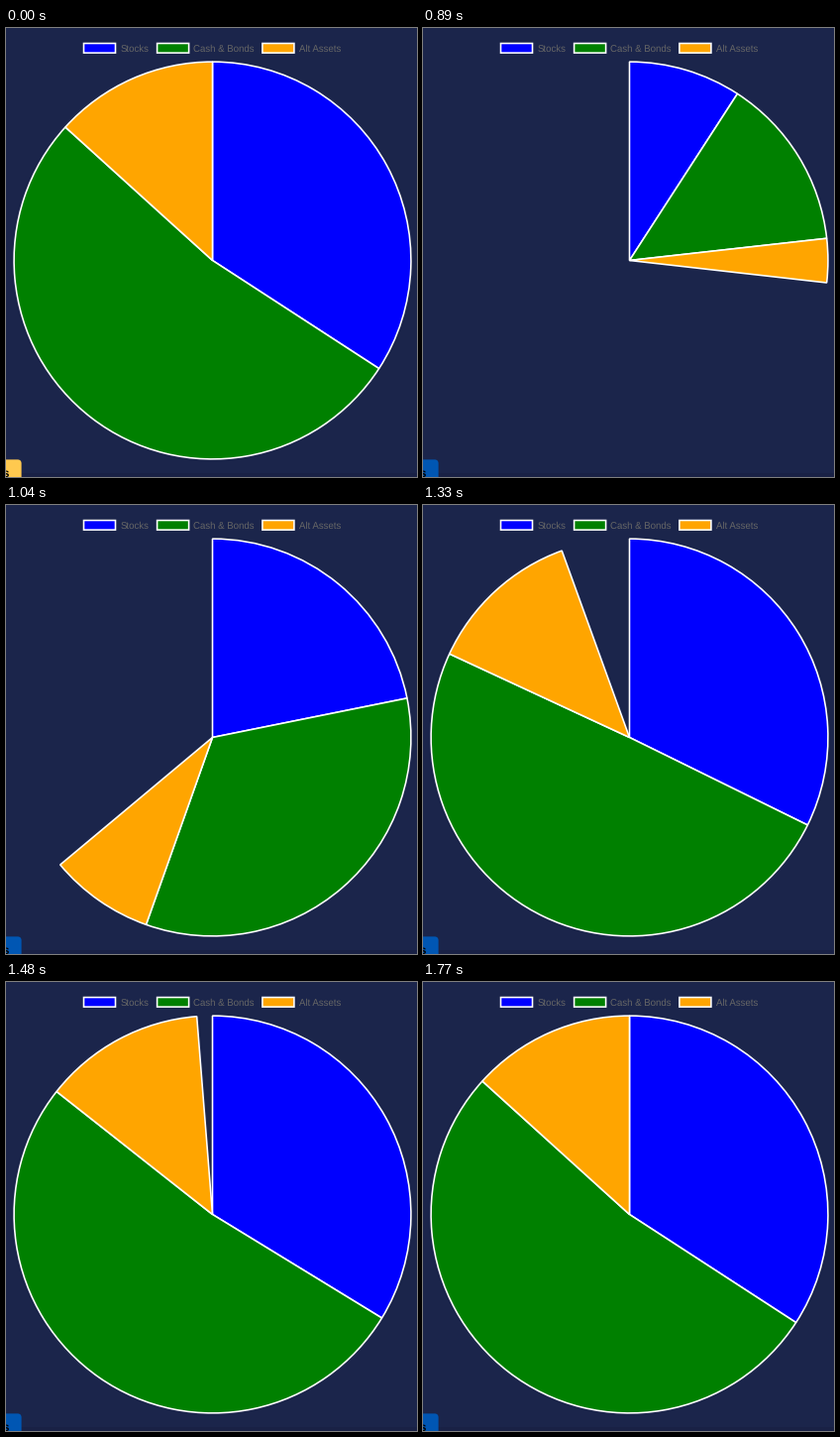
Animation, 415 px wide and 453 px high, one loop 2.67 s. Source, as a matplotlib script:

```python
import matplotlib.pyplot as plt
from matplotlib.animation import FuncAnimation
from matplotlib.patches import FancyBboxPatch, Rectangle, Wedge

W, H, DPI = 415, 453, 64
PT = 72 / DPI  # points per pixel
STEP, LOOP = 10, 2670

NAVY, YELLOW, BLUE = "#1b254b", "#ffc94f", "#0056b3"
CENTER, RADIUS, BORDER = (208.5, 234.5), 200.4, 1.6
SLICES = [
    ("Stocks", "blue", 0.3416, 78.5),
    ("Cash & Bonds", "green", 0.5255, 152.6),
    ("Alt Assets", "orange", 0.1329, 258.9),
]
PRESS = 300
START, DURATION = 815, 1000
TICKS = (890, 1040, 1180, 1330, 1480, 1620, 1770)

plt.rcParams.update({"font.family": "Liberation Sans", "text.hinting": "none"})
fig = plt.figure(figsize=(W / DPI, H / DPI), dpi=DPI, facecolor=NAVY)
ax = fig.add_axes([0, 0, 1, 1])
ax.set(xlim=(0, W), ylim=(H, 0))
ax.axis("off")


def label(x, y, text, size, **style):
    ax.text(x, y, text, fontsize=size * PT, va="baseline", **style)


ax.add_patch(Rectangle((0, 448.5), W, 5, fc="#192145", lw=0))

outline = dict(ec="white", lw=BORDER * PT, joinstyle="bevel")
wedges = []
for name, color, share, x in SLICES:
    ax.add_patch(Rectangle((x, 15.5), 32, 9.6, fc=color, ec="white",
                           lw=BORDER * PT, joinstyle="miter", snap=False))
    label(x + 36.6, 23.7, name, 9.65, color="#666666")
    wedge = Wedge(CENTER, RADIUS, -90, 0, fc=color, **outline)
    wedges.append(ax.add_patch(wedge))

button = ax.add_patch(FancyBboxPatch(
    (-40, 435.4), 55.6, 40, boxstyle="round,pad=0,rounding_size=4", lw=0))
label(3.4, 453, "s", 11.5, color="black", weight="bold", ha="right")


def sweep(ms):
    """Share of the full circle that is open, eased out by a quartic."""
    passed = [t for t in TICKS if t <= ms]
    if not passed:
        return 1
    p = min((passed[-1] - START) / DURATION, 1)
    return 1 - (1 - p) ** 4


def draw(i):
    ms = i * STEP
    button.set_facecolor(YELLOW if ms < PRESS else BLUE)
    turn = 360 * sweep(ms)
    angle = -90
    for wedge, (_, _, share, _) in zip(wedges, SLICES):
        end = angle + share * turn
        wedge.set_theta1(angle)
        wedge.set_theta2(end)
        angle = end
    return [button, *wedges]


anim = FuncAnimation(fig, draw, frames=LOOP // STEP, interval=STEP,
                     repeat=True, repeat_delay=0)
plt.show()
```
